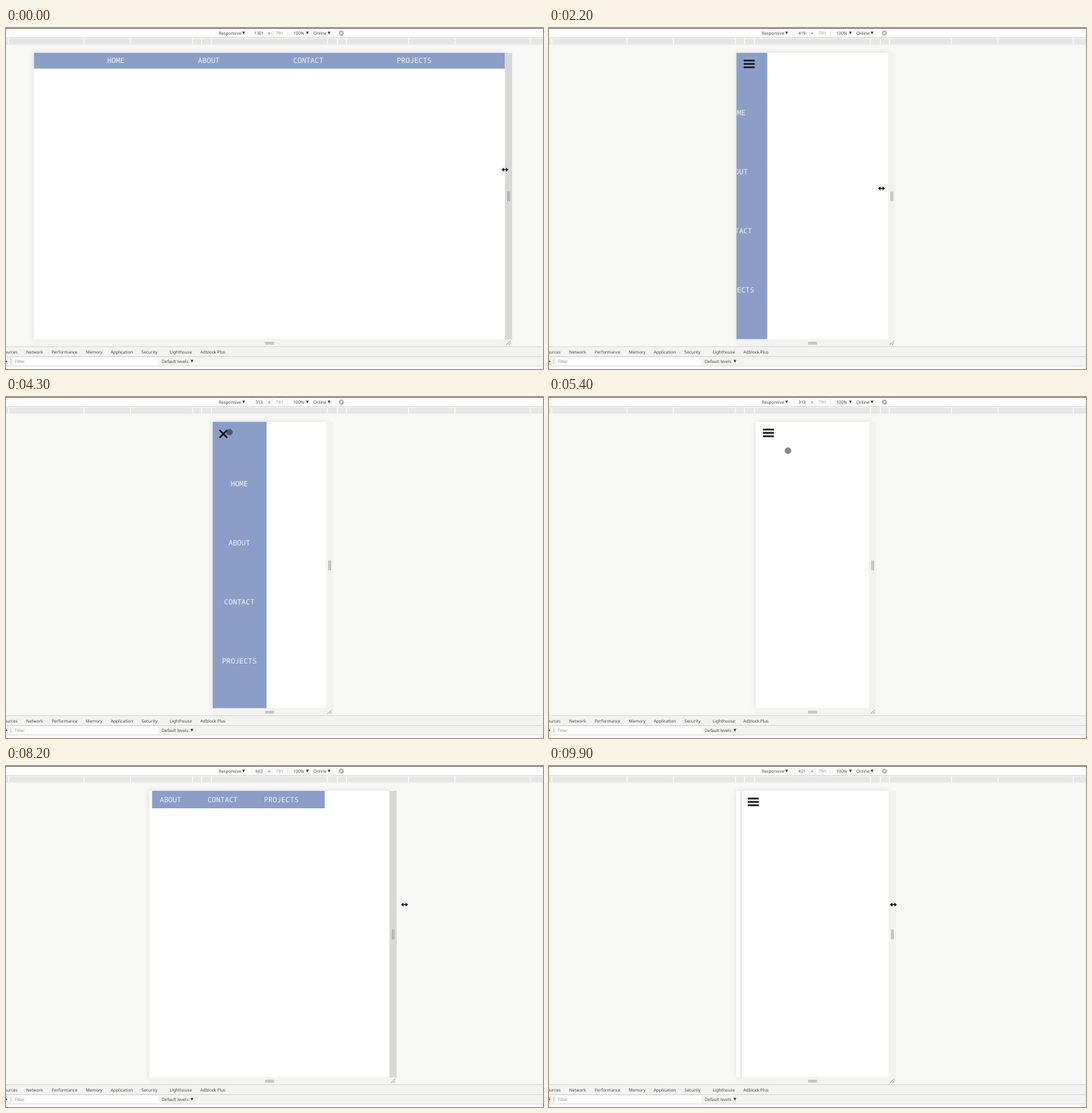
An HTML page for the animation above (10000 ms loop, 800 by 508 pixels).

```html
<!DOCTYPE html>
<html lang="en">
<head>
<meta charset="utf-8">
<title>Responsive navigation</title>
<style>
html, body { margin: 0; width: 100%; height: 100%; overflow: hidden; background: #f8f8f7; }
svg { display: block; }
text { font: 6.3px "Noto Sans", "Open Sans", sans-serif; fill: #444; text-rendering: geometricPrecision; white-space: pre; }
.dim { fill: #888; }
.mid { text-anchor: middle; }
.link { font: 10.75px "Noto Sans Mono", "DejaVu Sans Mono", monospace; fill: #f3f5fa; text-anchor: middle; }
#page { overflow: hidden; }
#device { filter: drop-shadow(0 0 4px rgba(0,0,0,.12)); }
.grip { stroke: #858585; stroke-width: .9; fill: none; }
.bar { stroke: #121212; stroke-width: 2.5; }
</style>
</head>
<body>
<svg width="100%" height="100%" viewBox="0 0 800 508">
  <rect width="800" height="508" fill="#f8f8f7"/>
  <rect width="800" height="14.5" fill="#fdfdfd"/>
  <rect width="800" height="1" fill="#626262"/>
  <rect y="14" width="800" height="1" fill="#d2d2d2"/>
  <rect y="15" width="800" height="10" fill="#fafafa"/>
  <rect y="16" width="800" height="8.7" fill="#e6e6e4"/>
  <g id="marks" fill="#fff"></g>
  <g fill="#fff" stroke="#e6e6e6" stroke-width=".6">
    <rect x="365.5" y="2.5" width="23" height="10.5"/>
    <rect x="396.5" y="2.5" width="23" height="10.5"/>
  </g>
  <text id="size" class="mid" x="377" y="10"></text>
  <text class="mid" x="392" y="10">×</text>
  <text class="mid dim" x="407.5" y="10">791</text>
  <g fill="none" stroke="#666" stroke-width=".7">
    <circle cx="499.6" cy="7.6" r="3.2"/>
    <rect x="498.3" y="5.5" width="2.6" height="4.2" rx=".5" transform="rotate(-45 499.6 7.6)"/>
  </g>

  <rect id="device" y="37" height="426.5" fill="#fff"/>
  <svg id="page" y="37" height="426.5">
    <rect id="edge" width="1" height="427" fill="#b8b8b8"/>
    <rect id="nav" fill="#8b9ec8"/>
    <g id="links"></g>
    <g id="burger"></g>
  </svg>
  <rect id="side" y="37" width="10.7" height="427"/>
  <rect id="foot" y="464" height="10" fill="#f3f3f2"/>
  <path class="grip" d="M386 468.3h13.5M386 470.6h13.5"/>
  <path id="grips" class="grip" d="M4.2 243.5v14.5M6.5 243.5v14.5M2 472l6.5-6M5.5 472l3-2.8"/>

  <rect y="474.5" width="800" height="34" fill="#f3f3f2"/>
  <path d="M0 474.8h800M0 489.5h800M0 503.8h800" stroke="#cfcfcf" stroke-width=".8"/>
  <rect x="11" y="491" width="216" height="11.5" fill="#fff"/>
  <rect y="504.2" width="800" height="4" fill="#fff"/>
  <path d="M7.3 492.5v8" stroke="#bbb" stroke-width=".8"/>
  <path d="M-1 494.3l3.2 2.4-3.2 2.4z" fill="#444"/>
  <text class="dim" x="13" y="499">Filter</text>
  <g>
    <text x="-6" y="484.8">Sources</text>
    <text x="30" y="484.8">Network</text>
    <text x="68" y="484.8">Performance</text>
    <text x="119" y="484.8">Memory</text>
    <text x="156" y="484.8">Application</text>
    <text x="202" y="484.8">Security</text>
    <text x="244" y="484.8">Lighthouse</text>
    <text x="289.5" y="484.8">Adblock Plus</text>
  </g>
  <g>
    <text x="317" y="10">Responsive</text>
    <text x="428" y="10">100%</text>
    <text x="458" y="10">Online</text>
    <text x="232" y="499">Default levels</text>
    <path d="M351.9 5.4h4.2l-2.1 4zM446.9 5.4h4.2l-2.1 4zM479.2 5.4h4.2l-2.1 4zM274.9 494.4h4.2l-2.1 4z" fill="#333"/>
  </g>

  <circle id="touch" r="5" fill="rgba(20,20,20,.5)" stroke="rgba(255,255,255,.25)" stroke-width=".6"/>
  <path id="arrows" d="M-5.3 0l3.7-2.9v2.1h3.2v-2.1l3.7 2.9-3.7 2.9v-2.1h-3.2v2.1z" fill="#111"/>
</svg>
<script>
const $ = id => document.getElementById(id);
const set = (el, attrs) => { for (const k in attrs) el.setAttribute(k, attrs[k]); };
const show = (el, on) => { el.style.display = on ? '' : 'none'; };
const add = (parent, tag, attrs, text = '') => {
  const el = document.createElementNS('http://www.w3.org/2000/svg', tag);
  set(el, attrs);
  el.textContent = text;
  return parent.appendChild(el);
};

const NAMES = ['HOME', 'ABOUT', 'CONTACT', 'PROJECTS'];
const CHAR = 6.45, MID = 392.4, SCALE = .5396, LOOP = 10000;
const BREAKS = [2055, 7980, 9200];       // layout switches between bar and side menu
const TAPS = [3520, 4430, 5580, 6680];   // menu button pressed
const FLIPS = [...BREAKS, ...TAPS].sort((a, b) => a - b);

// Moves: start, end, then the values to reach
const DRAGS = [[1350, 2417, 313], [7950, 8385, 886], [8450, 9650, 395], [9890, 9910, 447]];
const TOUCHES = [[2500, 2950, 298, 75], [2950, 3300, 333, 52.5], [4400, 4900, 356, 80],
  [5420, 5600, 324, 48], [6750, 7500, 473, 207]];

const links = NAMES.map(s => add($('links'), 'text', { class: 'link' }, s));
const bars = [-1, 0, 1].map(() => add($('burger'), 'path', { class: 'bar', d: 'M-8.2 0h16.4' }));
for (const device of [320, 375, 425, 768, 1024, 1440])
  for (const side of [-1, 1])
    add($('marks'), 'rect', { x: MID - .5 + side * device * SCALE / 2, y: 16, width: 1.2, height: 8.7 });

const smooth = u => { u = Math.min(1, Math.max(0, u)); return u * u * (3 - 2 * u); };
const glide = (from, moves, t) => moves.reduce((now, [start, end, ...to]) =>
  now.map((v, i) => v + (to[i] - v) * smooth((t - start) / (end - start))), from);
const widthAt = t => glide([1301], DRAGS, t)[0];

// The CSS "ease" curve, cubic-bezier(.25, .1, .25, 1)
function ease(x) {
  if (x >= 1) return 1;
  let lo = 0, hi = 1;
  for (let i = 0; i < 20; i++) {
    const p = (lo + hi) / 2;
    if (.75 * p * (1 - p) + p ** 3 < x) lo = p; else hi = p;
  }
  const q = 1 - lo;
  return .3 * q * q * lo + 3 * q * lo * lo + lo ** 3;
}

// How far the menu is in view, 0 to 1
function shown(t, speed = 1) {
  const i = FLIPS.findLastIndex(start => start <= t);
  if (i < 0) return 1;
  const u = ease((t - FLIPS[i]) / (BREAKS.includes(FLIPS[i]) ? 500 : 900) * speed);
  return i % 2 ? u : 1 - u;
}

function drawNav(t, w, wide) {
  const open = shown(t);
  if (wide) {
    const height = w < 1024 * SCALE ? 26 : 23.5;
    const gap = (w - 24 * CHAR) / 5;
    let x = (open - 1) * w;
    set($('nav'), { x, width: w, height });
    links.forEach((el, i) => {
      const len = NAMES[i].length * CHAR;
      x += gap;
      set(el, { x: x + len / 2, y: height / 2 + 3.7 });
      x += len;
    });
  } else {
    const width = Math.max(81, w * .4), x = (open - 1) * width;
    const top = width > 81 ? 93 : 95.5;
    set($('nav'), { x, width, height: 427 });
    links.forEach((el, i) => set(el, { x: x + width / 2, y: top + 88 * i }));
  }
}

function drawBurger(t, wide) {
  const tapped = t >= TAPS[0] && t < BREAKS[1];
  const cross = tapped ? shown(t, 1.6) : 0;
  show($('burger'), !wide);
  bars.forEach((el, i) => {
    const side = i - 1;
    const x = 18.9 - 3 * cross, y = 16.5 + 1.5 * cross + 5 * side * (1 - cross);
    set(el, {
      transform: `translate(${x} ${y}) rotate(${45 * side * cross})`,
      opacity: side ? 1 : 1 - cross
    });
  });
}

function drawPointer(t) {
  const resize = t < 2500 || t >= 7700;
  // While dragging, the pointer runs ahead of the frame
  const [x, y] = resize
    ? [MID + widthAt(t + 45) * SCALE / 2, t < 2500 ? 211 + 28 * smooth((t - 1350) / 850) : 206.5]
    : glide([477, 240], TOUCHES, t);
  for (const id of ['arrows', 'touch']) set($(id), { transform: `translate(${x} ${y})` });
  show($('arrows'), resize);
  show($('touch'), !resize);
}

function draw(t) {
  const size = widthAt(t), w = size * SCALE, left = MID - w / 2, right = MID + w / 2;
  const pageW = Math.min(size, widthAt(t - 8)) * SCALE; // contents trail a growing frame
  const wide = BREAKS.filter(b => b <= t).length % 2 === 0;
  const held = t < 1900 || (t >= 7700 && t < 8700);

  $('size').textContent = Math.round(size);
  set($('device'), { x: left, width: w });
  set($('page'), { x: MID - pageW / 2, width: pageW });
  set($('side'), { x: right, fill: held ? '#d8d8d7' : '#f2f2f1' });
  set($('foot'), { x: left, width: w + 10.7 });
  set($('grips'), { transform: `translate(${right} 0)` });
  show($('edge'), !wide && (t < TAPS[0] || t > BREAKS[2]));
  drawNav(t, pageW, wide);
  drawBurger(t, wide);
  drawPointer(t);
}

// The picture advances ten times a second
const begin = performance.now();
(function tick() {
  draw(Math.floor((performance.now() - begin) % LOOP / 100) * 100);
  requestAnimationFrame(tick);
})();
</script>
</body>
</html>
```
